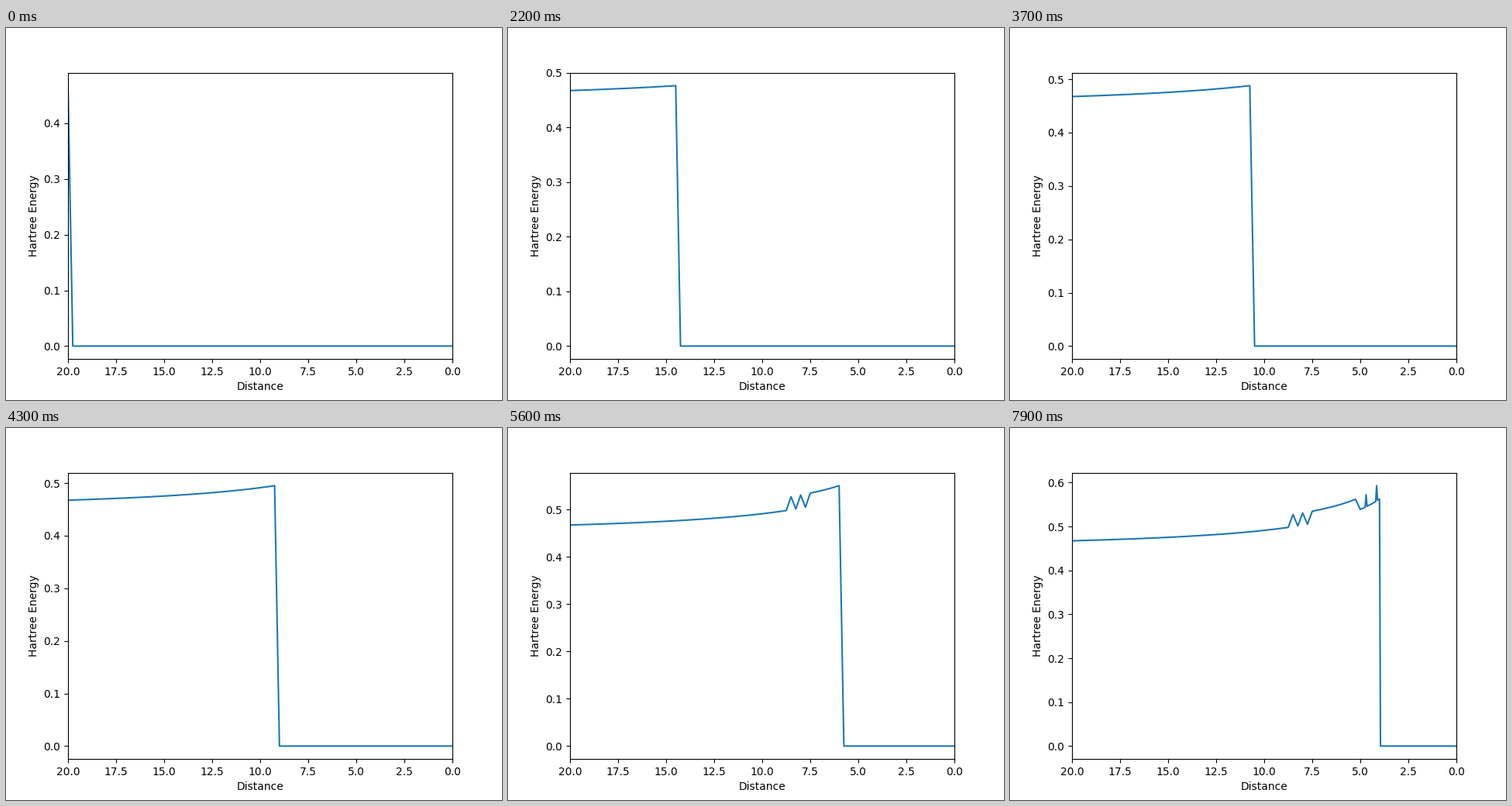
Animation, 640 px wide and 480 px high, one loop 8000 ms. Source, as a matplotlib script:

```python
import numpy as np
import matplotlib.pyplot as plt
from matplotlib.animation import FuncAnimation

FRAMES = 80
INTERVAL = 100

# Coarse steps far out, fine steps close in
x = np.concatenate([20 - 0.25 * np.arange(61), 4.9 - 0.05 * np.arange(99)])


def energy(r):
    """Smooth 1/r curve with jumps to a higher branch."""
    base = 0.4436 + 0.476 / np.maximum(r, 0.05)
    jumps = [8.5, 8.0, 4.7]
    upper = ((r > 5.2) & (r < 7.6)) | np.isclose(r[:, None], jumps).any(axis=1)
    return base + 0.0277 * upper + 0.0347 * np.isclose(r, 4.15)


full = energy(x)

fig, ax = plt.subplots(figsize=(6.4, 4.8), dpi=100)
line, = ax.plot(x, np.zeros_like(x), color="#1f77b4", lw=1.5)
ax.set_xlim(20, 0)
ax.set_xlabel("Distance")
ax.set_ylabel("Hartree Energy")


def update(i):
    y = np.where(np.arange(len(x)) <= i, full, 0)
    line.set_ydata(y)
    top = y.max()
    ax.set_ylim(-0.05 * top, 1.05 * top)
    return line,


anim = FuncAnimation(fig, update, frames=FRAMES, interval=INTERVAL,
                     repeat=True, repeat_delay=0, blit=False)
plt.show()
```
